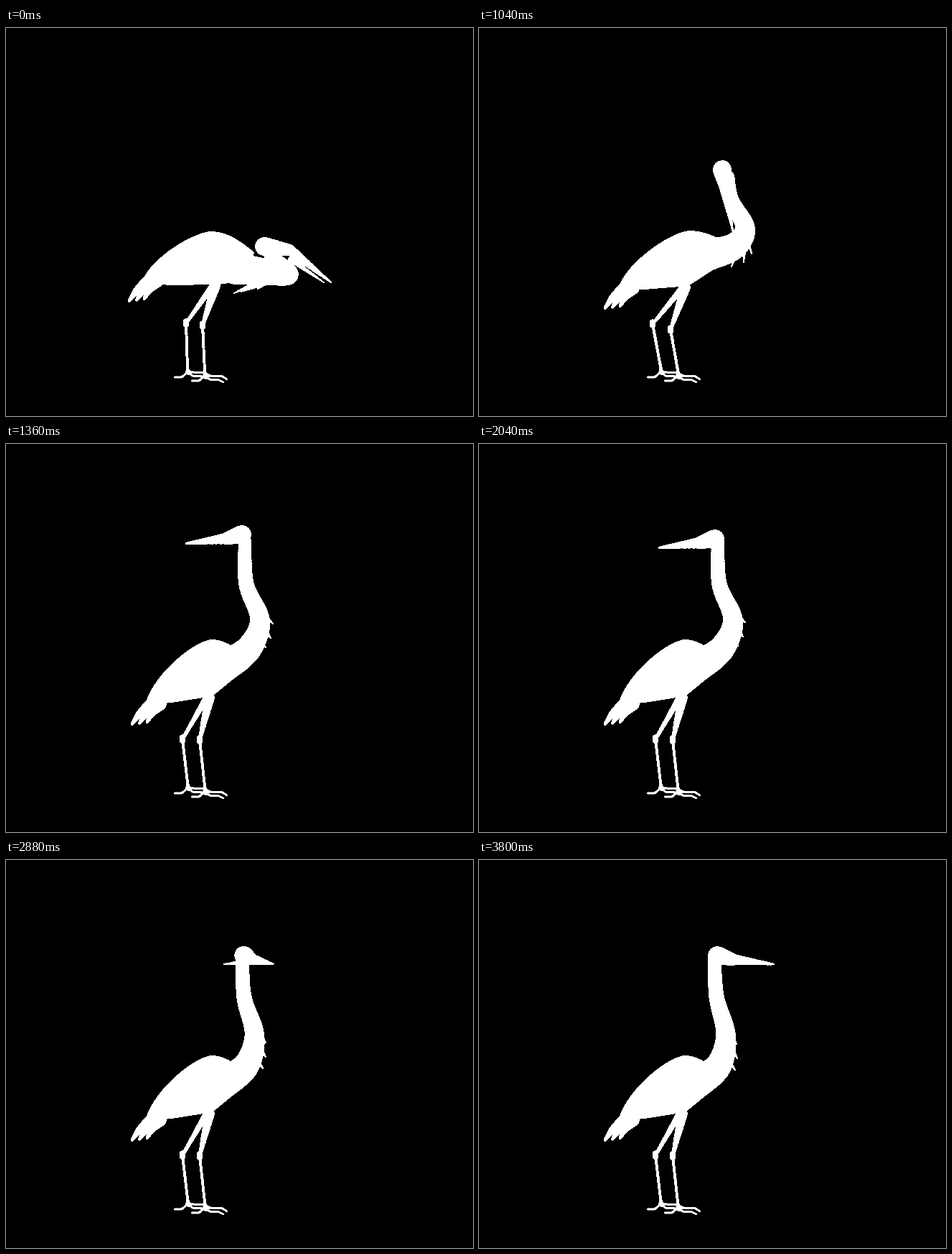
These frames come from a looping animation (651 by 540 pixels, 4040 ms). An HTML page with a canvas:

```html
<!DOCTYPE html>
<html lang="en">
<head>
<meta charset="utf-8">
<title>Heron</title>
<style>
  html, body { margin: 0; width: 100%; height: 100%; overflow: hidden; background: #000; }
  canvas { display: block; filter: contrast(20); } /* hard silhouette edge */
</style>
</head>
<body>
<canvas id="stage" width="651" height="540"></canvas>
<script>
const LOOP = 4040, STEP = 40;
const ctx = document.getElementById('stage').getContext('2d');

// Joints. body: rump, back, shoulder, hip; neck: chest to nape;
// head: skull, brow, upper tip, jaw, lower tip; plumes: three tips.
const crouch = {
  body: [[190, 353], [285, 283], [346, 312], [296, 357]],
  knees: [[251, 411], [274, 414]],
  neck: [[320, 335], [360, 339], [394, 343], [374, 322], [365, 308]],
  head: [[360, 304], [396, 309], [453, 354], [397, 322], [443, 354]],
  plumes: [[351, 363], [328, 367], [318, 369]]
};
const dip = {
  body: [[191, 361], [286, 293], [349, 322], [296, 366]],
  knees: [[245, 413], [270, 422]],
  neck: [[320, 345], [360, 351], [396, 356], [385, 333], [372, 320]],
  head: [[362, 316], [391, 319], [435, 382], [405, 352], [427, 378]],
  plumes: [[353, 374], [329, 376], [319, 378]]
};
const rise = {
  body: [[194, 363], [293, 282], [335, 293], [292, 359]],
  knees: [[242, 412], [267, 420]],
  neck: [[318, 316], [355, 304], [371, 278], [352, 240], [347, 207]],
  head: [[339, 197], [340, 214], [354, 283], [345, 214], [353, 282]],
  plumes: [[380, 314], [369, 326], [352, 332]]
};
const left = {
  body: [[194, 363], [286, 272], [312, 279], [288, 351]],
  knees: [[246, 411], [270, 412]],
  neck: [[303, 310], [338, 285], [354, 245], [335, 195], [333, 135]],
  head: [[329, 132], [306, 137.5], [251, 144], [322, 141], [251, 145]],
  plumes: [[372, 250], [369, 270], [362, 283]]
};
const right = {
  ...left,
  neck: [[303, 310], [334, 286], [344, 243], [331, 190], [328.5, 137]],
  head: [[332, 133], [355, 138.5], [411, 145], [340, 142], [410, 145.5]],
  plumes: [[359, 256], [360, 276], [357, 292]]
};

function mix(a, b, t) {
  if (typeof a === 'number') return a + (b - a) * t;
  if (Array.isArray(a)) return a.map((v, i) => mix(v, b[i], t));
  return Object.fromEntries(Object.keys(a).map(k => [k, mix(a[k], b[k], t)]));
}
const move = (pts, dx, dy) => pts.map(([x, y]) => [x + dx, y + dy]);
const lift = (pose, dy) => ({ ...pose, head: move(pose.head, 0, dy) });
const sway = pose => ({ ...pose, plumes: move(pose.plumes, -1, -2) });

// Head turn: the lower bill trails the upper one.
function turn(p, trail) {
  const pose = mix(left, right, p);
  pose.head[4] = mix(left.head[4], right.head[4], trail);
  return pose;
}

const swing = {
  ...mix(rise, left, .8),
  head: [[331, 145], [320, 158], [294, 217], [328, 156], [294, 217]]
};
const timeline = [
  [0, crouch], [879, crouch], [880, dip], [920, dip], [1040, rise], [1120, swing],
  [1240, lift(left, -9)], [1360, lift(left, -6)], [1400, lift(left, -6)],
  [1960, sway(left)], [2240, left], [2560, left],
  [2880, turn(.76, .33)], [3000, turn(1.05, .75)], [3120, sway(right)], [3800, right]
];

function poseAt(t) {
  const n = timeline.findIndex(k => k[0] > t);
  if (n < 0) return right;
  const [t0, a] = timeline[n - 1], [t1, b] = timeline[n];
  const p = (t - t0) / (t1 - t0);
  return mix(a, b, t1 - t0 > 500 ? Math.sin(p * Math.PI / 2) : p);
}

// Catmull-Rom point at u, counted in knots.
function spline(pts, u) {
  const last = pts.length - 1;
  const i = Math.min(Math.floor(u), last - 1), t = u - i;
  const [a, b, c, d] = [i - 1, i, i + 1, i + 2].map(k => pts[Math.max(0, Math.min(last, k))]);
  return b.map((v, k) => v + t / 2 * (c[k] - a[k]
    + t * (2 * a[k] - 5 * v + 4 * c[k] - d[k] + t * (3 * (v - c[k]) + d[k] - a[k]))));
}

// Limb through [x, y, radius] knots.
function taper(...pts) {
  const n = 14 * (pts.length - 1);
  let prev = pts[0];
  for (let i = 1; i <= n; i++) {
    const cur = spline(pts, i / 14);
    ctx.lineWidth = Math.max(1, prev[2] + cur[2]);
    ctx.beginPath();
    ctx.moveTo(prev[0], prev[1]);
    ctx.lineTo(cur[0], cur[1]);
    ctx.stroke();
    prev = cur;
  }
}

function drawBody([[tx, ty], [px, py], [sx, sy], [hx, hy]], [chest]) {
  const w = px - tx, h = py - ty, dx = sx - px, dy = sy - py;
  ctx.beginPath();
  ctx.moveTo(tx, ty);
  ctx.bezierCurveTo(tx + .09 * w, ty + .42 * h, px - .3 * w, py - .04 * h, px, py);
  ctx.bezierCurveTo(px + .4 * dx, py, sx - .3 * dx, sy - .5 * dy, sx, sy);
  ctx.lineTo(chest[0] + 14, chest[1] + 17);
  ctx.lineTo(hx, hy);
  ctx.lineTo(tx + 37, (ty + hy) / 2 + 3);
  ctx.fill();
  for (let i = 0; i < 3; i++) {
    const x = tx + 8 + 7 * i, y = ty - 1;
    const ex = tx - 18.5 + 10.5 * i, ey = ty + 27 - 1.3 * i;
    taper([x, y, 8], [mix(x, ex, .55) - 1, mix(y, ey, .55) - 2, 5], [ex, ey, 1.8]);
  }
}

function drawLeg(hip, knee, foot, thigh) {
  const [x, y] = foot;
  taper([...hip, thigh], [...knee, 2.3]);
  taper([knee[0], knee[1] - 3, 3.6], [knee[0], knee[1] + 2, 3.6]);
  taper([...knee, 2], [x, y - 8, 2], [x + 1, y, 3.5]);
  ctx.lineWidth = 3;
  ctx.beginPath();
  for (const toe of [[-8, 7, -18, 7], [9, 0, 25, 1, 31, 5], [7, 5, 20, 6, 26, 9]]) {
    ctx.moveTo(x, y);
    for (let i = 0; i < toe.length; i += 2) ctx.lineTo(x + toe[i], y + toe[i + 1]);
  }
  ctx.stroke();
}

function drawHead([skull, brow, upper, jaw, lower]) {
  taper([...skull, 13], [...brow, 7.7]);
  taper([...brow, 7.5], [...upper, 1]);
  taper([...jaw, 4], [...lower, .8]);
}

function draw(now) {
  const t = Math.floor((now % LOOP) / STEP) * STEP;
  const { body, knees, neck, head, plumes } = poseAt(t);
  const [hx, hy] = body[3];
  ctx.fillStyle = '#000';
  ctx.fillRect(0, 0, 651, 540);
  ctx.fillStyle = ctx.strokeStyle = '#fff';
  ctx.lineCap = ctx.lineJoin = 'round';

  drawBody(body, neck);
  drawLeg([hx - 9, hy + 3], knees[0], [253, 479], 4.5);
  drawLeg([hx - 4, hy + 2], knees[1], [277, 484], 7);
  taper(...neck.map((p, i) => [...p, [22, 18, 13.5, 10.5, 9][i]]));
  plumes.forEach((tip, i) => taper([...spline(neck, 2.4 - .5 * i), 6], [...tip, .8]));
  drawHead(head);
  requestAnimationFrame(draw);
}

draw(0);
</script>
</body>
</html>
```
